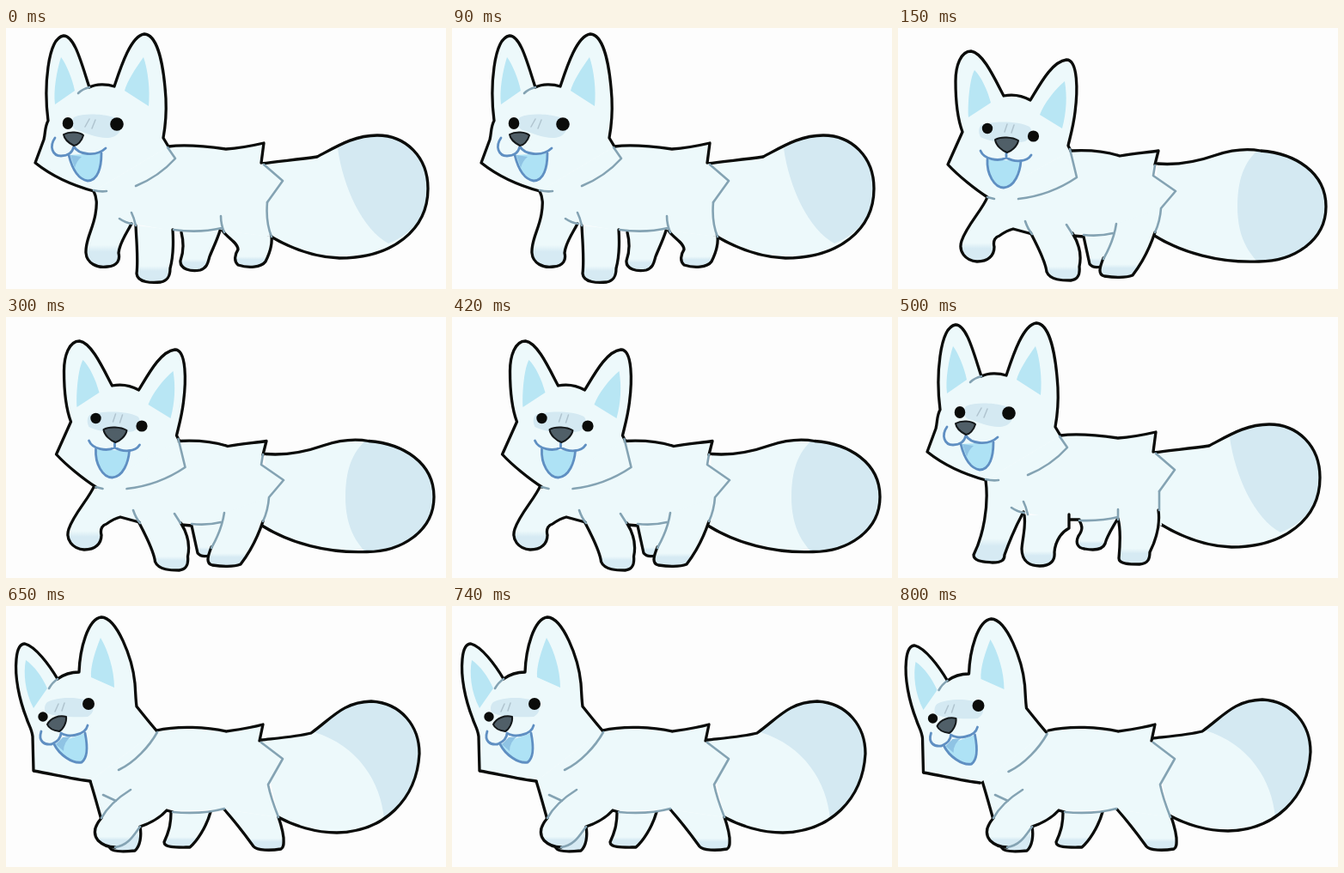
Write an HTML page that moves like this. It is 512 px wide and 304 px high and loops after 950 ms.

```html
<!DOCTYPE html>
<html lang="en">
<head>
<meta charset="utf-8">
<title>Walking fox</title>
<style>
  html, body { margin: 0; width: 100%; height: 100%; overflow: hidden; background: #fdfdfd; }
  svg { display: block; width: 100vw; height: 100vh; }
  path { fill: none; stroke-linecap: round; stroke-linejoin: round; }
  .ink { stroke: #0b0c0a; stroke-width: 3.3; }
  .fur { fill: #edf9fb; }
  .leg { fill: url(#paw); }
  .leg:not(.bare) { stroke: #0b0c0a; stroke-width: 3.3; }
  .tint { fill: #e4eff6; mix-blend-mode: multiply; }
  .ear { fill: #b8e6f4; }
  .seam { stroke: #84a3b3; stroke-width: 2.6; }
  .hatch { stroke: #b0c4cf; stroke-width: 1.5; }
  .nose { fill: #505f68; stroke: #14181a; stroke-width: 2; }
  .tongue { fill: #aee2f5; stroke: #5f8fc2; stroke-width: 2.8; }
  .throat { fill: #8fc3e4; }
  .mouth { stroke: #5f8fc2; stroke-width: 2.8; }
  .eye { fill: #0b0c0a; }

  /* Poses cut hard from one to the next. */
  .pose, .step, .nudge { animation: 950ms step-end infinite; }
  .stand { animation-name: stand; }
  .step-a { animation-name: step-a; }
  .step-b { animation-name: step-b; }
  .bounce { animation-name: bounce; }
  .lean { animation-name: lean; }
  .bounce .nudge { animation-name: settle; }
  .lean .nudge { animation-name: stretch; }
  @keyframes stand {
    0% { visibility: visible } 15.789% { visibility: hidden }
    52.631% { visibility: visible } 68.421%, 100% { visibility: hidden }
  }
  @keyframes step-a { 0% { visibility: visible } 15.789%, 100% { visibility: hidden } }
  @keyframes step-b {
    0% { visibility: hidden } 52.631% { visibility: visible } 68.421%, 100% { visibility: hidden }
  }
  @keyframes bounce {
    0% { visibility: hidden } 15.789% { visibility: visible } 52.631%, 100% { visibility: hidden }
  }
  @keyframes lean { 0% { visibility: hidden } 68.421%, 100% { visibility: visible } }
  @keyframes settle { 0% { translate: 0 0 } 31.578%, 100% { translate: var(--by) } }
  @keyframes stretch { 0% { translate: 0 0 } 84.21%, 100% { translate: var(--by) } }
</style>
</head>
<body>
<svg viewBox="0 0 512 304">
  <defs>
    <linearGradient id="paw" x2="0" y2="1">
      <stop offset=".71" stop-color="#edf9fb"/>
      <stop offset=".8" stop-color="#d6eaf3"/>
    </linearGradient>
  </defs>

  <g class="pose stand">
    <path class="ink fur" d="M297 158C320 155 340 153 362 150C385 138 405 125 432 125C465 125 491 150 491 187C491 235 450 268 388 268C355 267 328 255 305 241"/>
    <path class="tint" d="M386 140C402 130 417 125 432 125C465 125 491 150 491 187C491 215 475 239 445 251C415 235 392 185 386 140"/>
    <path class="fur" d="M102 190L189 138Q225 134 256 141L300 134L297 157L322 178L304 203L307 243L252 236H195L147 228L104 215Z"/>
    <g class="step step-a">
      <path class="leg" d="M204 238C207 250 207 260 203 271C202 281 215 284 226 282C235 279 235 272 237 266C241 256 246 246 249 236"/>
      <path class="leg" d="M252 236C258 245 270 250 270 258C266 264 265 272 270 276C282 280 297 279 302 272C306 264 310 252 309 243"/>
      <path class="leg" d="M102 190C106 198 106 205 104 217C101 235 92 247 93 262C94 274 106 280 118 278C130 277 133 270 131 262C132 250 141 238 146 228"/>
      <path class="leg" d="M151 230C152 252 154 270 152 286C153 297 170 297 180 296C189 294 191 288 191 280C195 265 195 250 194 235"/>
      <path class="seam" d="M250 219Q250 229 254 238M195 235Q225 239 251 233M304 203Q302 226 309 243"/>
    </g>
    <g class="step step-b">
      <path class="leg" d="M211 237C215 244 215 248 210 255C206 263 209 269 217 270C228 272 238 271 241 264C243 255 250 245 255 236"/>
      <path class="leg" d="M256 235C260 250 258 270 257 281C257 288 270 288 281 288C291 287 293 282 293 274C301 258 305 240 303 225"/>
      <path class="leg" d="M102 190C106 220 99 255 88 277C88 285 100 285 110 286C121 286 124 283 124 277C130 260 139 240 146 227"/>
      <path class="leg" d="M147 231C149 245 145 256 144 270C144 286 155 290 165 290C177 290 183 284 182 274C183 260 191 250 199 246L199 230"/>
      <path class="ink" d="M200 236H211"/>
      <path class="seam" d="M211 237Q237 238 256 233M256 224V236M304 203V225"/>
    </g>
    <path class="ink" d="M189 138C210 135 235 138 256 141C272 140 287 137 300 134L297 157"/>
    <path class="seam" d="M300 159L322 178L304 203M132 222Q139 227 147 228M146 215Q149 221 151 230"/>
    <path class="ink fur" d="M102 190C80 184 54 173 34 157L44 130C46 122 45 115 49 108C44 70 48 12 67 9C80 9 88 42 97 69C105 65 117 65 126 68C133 47 145 9 161 7C178 8 184 50 186 82C187 103 185 117 183 128L189 138"/>
    <path class="seam" d="M97 69Q89 71 84 76M188 139L197 152Q178 173 151 184M102 189Q110 191 117 190"/>
    <path class="ear" d="M64 34C59 50 55 72 57 89L80 73C77 58 70 42 64 34M160 34C150 48 141 62 138 73L166 91C168 72 165 48 160 34"/>
    <path class="tint" d="M79 104C95 97 128 102 133 108C137 120 128 128 118 128C104 128 94 122 82 119C75 116 76 108 79 104"/>
    <path class="hatch" d="M97 106l-5 9M104 107l-4 10"/>
    <ellipse class="eye" cx="72" cy="111" rx="6.3" ry="7"/>
    <circle class="eye" cx="129" cy="112" r="7.8"/>
    <path class="tongue" d="M73 148C76 160 82 176 95 178C107 178 111 162 111 146"/>
    <path class="throat" d="M75 148L88 150Q82 155 80 163Z"/>
    <path class="mouth" d="M57 128C50 138 54 149 64 149C72 149 77 146 79 138C84 147 104 151 116 140"/>
    <path class="nose" d="M67 124C74 120 86 121 90 125C88 132 83 137 79 137C73 134 68 130 67 124Z"/>
  </g>

  <g class="pose bounce">
    <g class="nudge" style="--by: 0 1.5px">
      <path class="ink fur" d="M302 158C325 160 350 155 370 148C385 143 405 140 422 143C462 146 498 168 498 208C498 248 460 272 420 272C375 274 330 262 297 241"/>
      <path class="tint" d="M418 143C462 146 498 168 498 208C498 248 460 272 418 272C402 255 395 235 395 208C395 185 399 160 418 143"/>
    </g>
    <path class="fur" d="M104 197L201 143Q235 141 258 149L303 143L297 172L323 190L306 210L299 240L250 240H204L156 240L134 234L100 215Z"/>
    <path class="leg bare" d="M216 242L223 275Q230 281 238 279L252 240Z"/>
    <path class="ink" d="M204 242L216 243L223 275Q227 280 236 278"/>
    <path class="fur" d="M254 228L240 272L299 238L306 210Z"/>
    <path class="leg" d="M239 268C235 278 232 287 240 289C255 291 266 291 273 288C283 275 292 259 299 238"/>
    <path class="leg nudge" style="--by: -1px -1px" d="M104 197C98 212 80 230 74 248C70 260 78 271 92 272C105 272 112 265 112 255C110 247 114 243 118 242C125 237 130 235 134 234L156 240"/>
    <path class="leg nudge" style="--by: .5px 1px" d="M154 238C163 255 172 275 173 284C177 294 192 294 201 294C209 293 212 288 211 278C214 264 210 250 203 239"/>
    <path class="ink nudge" style="--by: 0 1.5px" d="M201 143C220 142 240 143 258 149C275 146 290 145 303 143L299 159"/>
    <path class="seam" d="M299 160L297 172L323 190L306 210Q305 225 299 238M148 225Q151 234 156 240M196 229L203 240M216 241Q234 243 250 239M254 228Q251 248 239 269"/>
    <g class="nudge" style="--by: .5px 1px">
      <path class="ink fur" d="M104 197C90 188 70 172 58 159L75 121C69 105 67 85 67 62C67 44 73 27 85 27C99 29 112 58 123 79C133 77 145 79 154 84C165 66 179 39 196 37C210 37 209 75 206 98C204 115 200 128 198 137L201 143"/>
      <path class="seam" d="M200 141L208 174Q177 195 140 199M104 197L112 199"/>
      <path class="ear" d="M89 49C83 60 81 90 82 104L108 87C104 72 97 57 89 49M194 62C182 72 170 88 165 101L191 117C196 98 197 80 194 62"/>
      <path class="tint" d="M97 113C110 108 140 108 153 115C158 121 155 128 148 132C130 136 105 132 96 127C93 121 94 116 97 113"/>
      <path class="hatch" d="M127 112l-3 9M135 113l-3 9"/>
      <circle class="eye" cx="104" cy="117" r="6.2"/>
      <circle class="eye" cx="157.5" cy="126" r="6.6"/>
      <path class="tongue" d="M104 153C103 170 112 186 123 186C136 185 142 168 143 155"/>
      <path class="mouth" d="M96 143C100 153 117 156 126 151C136 157 150 156 155 148M126 151V144"/>
      <path class="nose" d="M113 130C120 126 133 127 140 131C139 138 131 144 127 145C121 143 114 137 113 130Z"/>
    </g>
  </g>

  <g class="pose lean">
    <g class="nudge" style="--by: -1px -2px">
      <path class="ink fur" d="M297 156C315 154 340 152 355 148C380 130 392 112 425 111C460 113 481 140 481 172C478 225 440 263 385 264C360 264 335 256 317 246"/>
      <path class="tint" d="M359 147C382 129 395 112 425 111C460 113 481 140 481 172C478 205 464 232 440 248C436 205 410 163 359 147"/>
    </g>
    <path class="fur" d="M98 204L175 145Q220 136 256 146L299 138L295 157L322 178L305 208L317 246L254 237L187 239L111 248Z"/>
    <path class="leg" d="M98 204C103 220 107 235 111 249L121 282C124 287 140 286 150 285C156 280 158 268 156 257"/>
    <path class="leg bare" d="M111 247C104 255 100 264 107 273C114 280 122 282 131 281C143 277 148 266 156 257C168 253 178 248 187 238"/>
    <path class="ink" d="M111 247C104 255 100 264 107 273C113 279 119 281 127 281M156 257C168 253 178 248 187 238L194 240"/>
    <path class="leg" d="M192 240C192 255 189 264 184 275C184 282 200 281 214 281C222 274 233 258 238 240"/>
    <path class="leg nudge" style="--by: 1px 0" d="M254 237C262 246 275 262 288 280C292 285 308 285 320 283C324 281 323 275 323 270C322 260 319 252 317 246"/>
    <path class="ink" d="M175 145C200 139 235 141 256 146C270 144 285 142 299 138L295 157"/>
    <path class="seam" d="M297 159L322 178L305 208Q308 223 317 246M145 214Q121 229 111 247M113 220L128 227M194 240Q228 243 254 236M127 281C142 279 148 268 156 257"/>
    <g class="nudge" style="--by: -2.5px 2px">
      <path class="ink fur" d="M98 204C78 202 55 196 32 192L31 152C30 143 26 138 24 131C15 108 10 82 12 62C13 50 16 44 22 44C34 47 50 68 60 85C68 79 76 77 85 77C86 50 95 15 111 13C129 14 147 60 150 90C151 105 151 110 152 117C160 127 168 137 175 145"/>
      <path class="seam" d="M60 85Q54 89 50 96M176 147C167 163 150 182 131 191"/>
      <path class="ear" d="M23 63C20 78 22 100 32 119L48 96C42 82 33 70 23 63M110 37C104 52 98 70 99 83L126 95C126 75 119 52 110 37"/>
      <path class="tint" d="M48 112C60 106 85 105 98 112C104 118 102 125 95 129C80 130 55 129 46 124C44 119 45 115 48 112"/>
      <path class="hatch" d="M61 114l-4 9M68 113l-3 9"/>
      <circle class="eye" cx="43" cy="129" r="5.7"/>
      <circle class="eye" cx="96" cy="114" r="7"/>
      <path class="tongue" d="M56 161C62 173 77 184 88 182C95 177 95 163 92 148"/>
      <path class="throat" d="M58 161L66 153L76 152Q67 158 67 169Z"/>
      <path class="mouth" d="M41 146C37 158 45 162 53 161C60 158 64 154 64 148C70 153 92 152 95 139"/>
      <path class="nose" d="M48 138C52 130 62 127 70 129C71 136 66 144 62 146C55 145 50 143 48 138Z"/>
    </g>
  </g>
</svg>
</body>
</html>
```
